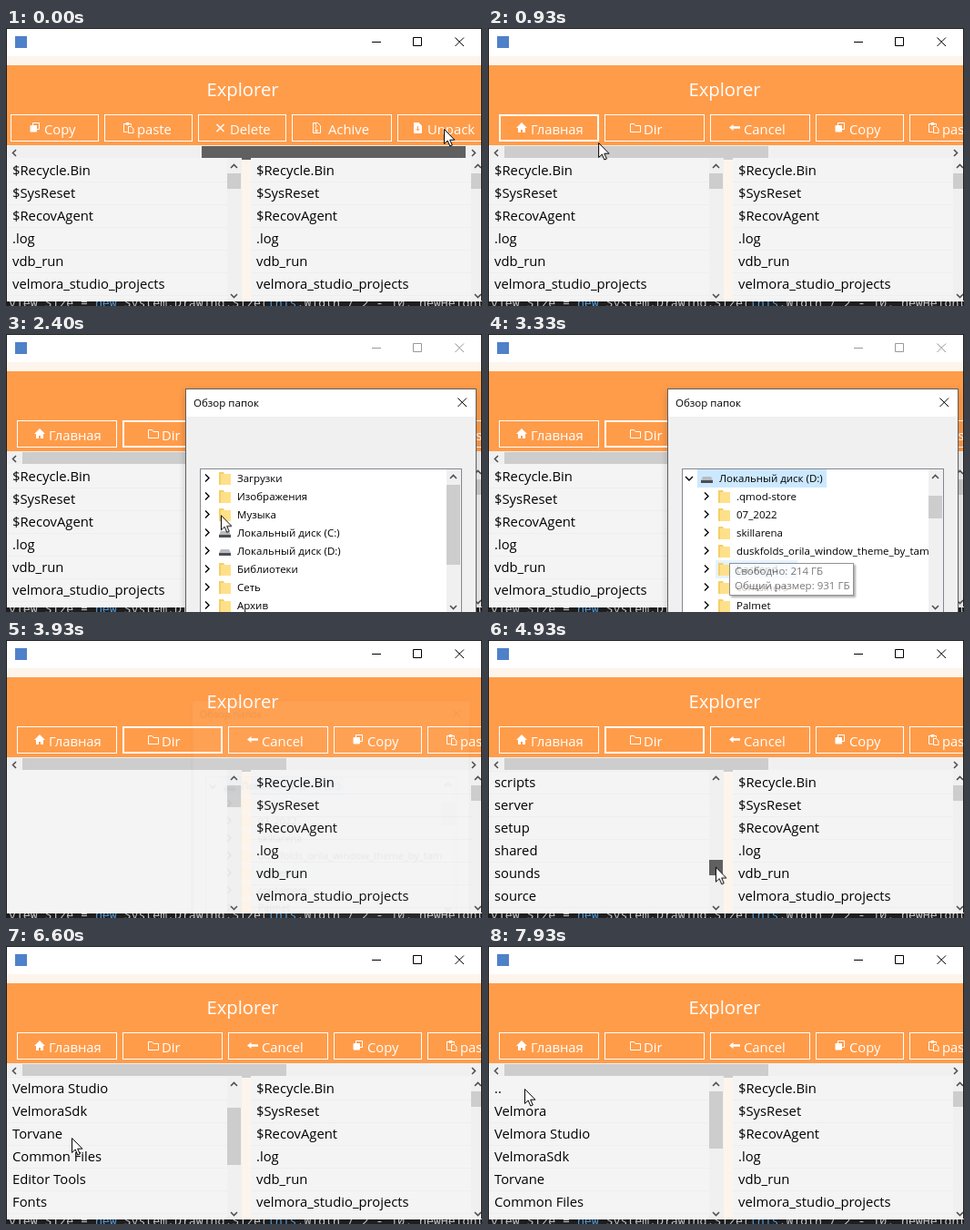
An HTML page for the animation above (8 s loop, 523 by 306 pixels).

```html
<!DOCTYPE html>
<html lang="ru">
<head>
<meta charset="utf-8">
<title>Explorer</title>
<style>
html, body { margin: 0; width: 100%; height: 100%; overflow: hidden; background: #1e1e1e; }
#stage { position: relative; width: 523px; height: 306px; overflow: hidden; background: #1e1e1e;
  font: 14.8px "Open Sans", "Noto Sans", sans-serif; color: #000; white-space: nowrap; }
#stage * { box-sizing: border-box; }
:where(#stage div, #stage svg) { position: absolute; left: 0; top: 0; }
#stage .anim { animation-duration: 8s; animation-iteration-count: infinite; animation-timing-function: linear; }
#stage .step { animation-timing-function: step-end; }
svg { overflow: visible; fill: none; stroke: currentColor; }

.code { left: 3px; top: 293px; font: 13.2px/18px "Noto Sans Mono", monospace; color: #c8c8c8; }
.code i { font-style: normal; color: #569cd6; }
.window { left: 1px; top: 1px; width: 521px; height: 300px; background: #fdf5ec; overflow: hidden; }
.view { left: -1px; top: -1px; width: 523px; height: 306px; }
.titlebar { width: 523px; height: 31px; background: #fff; }
.appicon { left: 10px; top: 9px; width: 13px; height: 13px; background: #4f81c9; }
.controls { animation-name: controls; }
.header { top: 41px; width: 523px; height: 88px; background: #ff9c4a; }
.heading { width: 520px; top: 52px; text-align: center; font-size: 20.3px; line-height: 30px; color: #fff; }
.tools { top: 95px; color: #fff; animation-name: tools; }
.tool { height: 30px; border: 1px solid #fff; }
.tools .label { top: 5px; line-height: 22px; }
.tools svg { top: 9px; }
.focus { height: 30px; width: 110px; border: 2px solid #fff; }
.focus.home { left: 12px; animation-name: homeFocus; }
.focus.dir { left: 128px; animation-name: dirFocus; }

.bar { background: #f0f0f0; color: #505050; }
.thumb { background: #cdcdcd; }
.hbar { left: 1px; top: 129px; width: 521px; height: 16px; }
.hbar .thumb { left: 17px; top: 1px; width: 290px; height: 15px; animation-name: hthumb; }
.pane { top: 143px; width: 258px; height: 158px; background: #f4f4f4; overflow: hidden; }
.pane .bar { left: 242px; width: 16px; height: 158px; }
.pane .thumb { top: 17px; width: 15px; height: 17px; }
.list { top: 2px; width: 242px; }
.list p { margin: 0; height: 25px; padding-left: 6px; line-height: 22px; border-bottom: 1px solid #eee; }
#left .thumb { animation-name: vthumb; }
#drive { animation-name: driveShow; }
#disk { animation-name: diskShow; }
#disk .list { animation-name: diskScroll; }
#folder { animation-name: folderShow; }
#folder .list { animation-name: folderScroll; }

.dialog { left: 197px; top: 60px; width: 320px; height: 290px; background: #f0f0f0; border: 1px solid #606060;
  box-shadow: 0 3px 8px #0003; transform-origin: 160px 143px; font-size: 11.5px; animation-name: dialog; }
.dialog .caption { width: 318px; height: 30px; background: #fff; line-height: 29px; padding-left: 8px; }
.tree { left: 15px; top: 87px; width: 288px; height: 161px; background: #f0f0f0; border: 1px solid #828790; overflow: hidden; }
.tree .bar { left: 270px; width: 16px; height: 159px; }
.tree .thumb { width: 15px; animation-name: treeThumb; }
.rows { width: 270px; height: 159px; background: #fff; }
#places { animation-name: placesShow; }
#children { animation-name: childrenShow; }
.row { height: 20px; line-height: 19px; }
.hl { height: 20px; background: #cce8ff; }
.tip { left: 265px; top: 252px; width: 137px; height: 36px; background: #fff; border: 1px solid #767676; color: #575757;
  box-shadow: 2px 2px 2px #0006; font-size: 11.5px; line-height: 16px; padding: 0 5px; white-space: pre; animation-name: tip; }
.cursor { animation-name: cursor; }

@keyframes controls { 0%, 46.8% { color: #000; } 22.5% { color: #999; } 100% { color: #000; } }
@keyframes tools {
  0%, .875% { transform: translateX(-355px); }
  6.25%, 100% { transform: none; }
}
@keyframes hthumb {
  0%, .875% { transform: translateX(197px); background: #606060; }
  6.25% { transform: none; background: #606060; }
  6.3%, 100% { transform: none; background: #cdcdcd; }
}
@keyframes homeFocus { 0% { visibility: visible; } 22.5%, 100% { visibility: hidden; } }
@keyframes dirFocus { 0%, 76.25%, 100% { visibility: hidden; } 22.5% { visibility: visible; } }
@keyframes driveShow { 0%, 13.3% { visibility: visible; } 12.5%, 47.5%, 100% { visibility: hidden; } }
@keyframes diskShow { 0%, 76.25%, 100% { visibility: hidden; } 50.8% { visibility: visible; } }
@keyframes folderShow { 0% { visibility: hidden; } 76.25%, 100% { visibility: visible; } }
@keyframes diskScroll {
  0%, 55.875% { transform: none; animation-timing-function: steps(30); }
  61.875%, 63.375% { transform: translateY(-750px); animation-timing-function: steps(17); }
  67.125%, 68.375% { transform: translateY(-325px); animation-timing-function: steps(2); }
  70.625%, 100% { transform: translateY(-275px); }
}
@keyframes folderScroll {
  0%, 92.4%, 100% { transform: none; }
  81.6% { transform: translateY(-25px); }
  82.4% { transform: translateY(-50px); }
  83.3% { transform: translateY(-75px); }
  84.1% { transform: translateY(-125px); }
  84.9% { transform: translateY(-150px); }
  90.8% { transform: translateY(-100px); }
  91.6% { transform: translateY(-50px); }
}
@keyframes vthumb {
  0%, 47.49% { top: 17px; height: 17px; background: #cdcdcd; }
  47.5%, 50.8% { top: 17px; height: 24px; }
  50.81%, 55.8% { top: 17px; height: 17px; background: #cdcdcd; }
  55.875% { top: 17px; height: 17px; background: #606060; }
  61.875%, 63.375% { top: 102px; height: 17px; }
  67.125%, 68.375% { top: 54px; height: 17px; }
  70.625% { top: 48px; height: 17px; background: #606060; }
  70.7%, 76.24% { top: 48px; height: 17px; background: #cdcdcd; }
  76.25%, 81.6% { top: 17px; height: 63px; }
  84.9%, 90.8% { top: 82px; height: 63px; }
  92.4%, 100% { top: 17px; height: 63px; background: #cdcdcd; }
}
@keyframes dialog {
  0%, 22.5% { transform: scale(.92); opacity: 0; }
  24.125% { transform: scale(.977); opacity: .52; }
  25.875%, 46.625% { transform: none; opacity: 1; }
  49.125% { transform: scale(.956); opacity: .06; }
  49.625%, 100% { transform: scale(.95); opacity: 0; }
}
@keyframes placesShow { 0%, 37.5%, 100% { opacity: 0; } 25.875% { opacity: 1; } }
@keyframes childrenShow { 0% { opacity: 0; } 37.5%, 100% { opacity: 1; } }
@keyframes treeThumb { 0% { top: 17px; height: 88px; } 37.5%, 100% { top: 29px; height: 25px; } }
@keyframes tip {
  0%, 34.9% { opacity: 0; }
  36%, 41% { opacity: 1; }
  41.625% { opacity: .8; }
  42.875%, 100% { opacity: 0; }
}
@keyframes cursor {
  0%, .875% { transform: translate(481px, 111px); }
  6.25% { transform: translate(284px, 150px); }
  9.375% { transform: translate(84px, 112px); }
  10.2% { transform: translate(90px, 114px); }
  11.625% { transform: translate(121px, 126px); }
  17.5%, 26% { transform: translate(171px, 108px); }
  31.625%, 40.5% { transform: translate(262px, 236px); }
  41.5% { transform: translate(262px, 310px); }
  52% { transform: translate(272px, 310px); }
  55%, 55.875% { transform: translate(248px, 168px); }
  61.875%, 63.375% { transform: translate(250px, 253px); }
  67.125%, 68.375% { transform: translate(247px, 206px); }
  70.625% { transform: translate(246px, 200px); }
  73.375% { transform: translate(73px, 212px); }
  74.125%, 95.5% { transform: translate(72px, 211px); }
  99%, 100% { transform: translate(40px, 157px); }
}
</style>
</head>
<body>
<div id="stage">
  <div class="code">view_Size = <i>new</i> System.Drawing.Size(<i>this</i>.Width / 2 - 10, newHeight</div>
  <div class="window"><div class="view">
    <div class="titlebar">
      <div class="appicon"></div>
      <svg class="controls anim step" width="523" height="31"><path d="M402 15.500h10M447.500 10.500h9v9h-9zM493.500 10.500l9.500 9.500m0-9.500l-9.500 9.500"/></svg>
    </div>
    <div class="header"></div>
    <div class="heading">Explorer</div>
    <div class="tools anim" id="tools">
      <div class="focus home anim step"></div>
      <div class="focus dir anim step"></div>
    </div>
    <div class="bar hbar">
      <div class="thumb anim"></div>
      <svg width="521" height="16" stroke-width="1.6"><path d="M10 5L6.500 8.500 10 12M511 5l3.500 3.500L511 12"/></svg>
    </div>
    <div class="pane" id="left" style="left:1px">
      <div id="drive" class="anim step"></div>
      <div id="disk" class="anim step"></div>
      <div id="folder" class="anim step"></div>
    </div>
    <div class="pane" id="right" style="left:269px"></div>
  </div></div>
  <div class="dialog anim">
    <div class="caption">Обзор папок</div>
    <svg width="320" height="30"><path d="M298.500 9.500l9.500 9.500m0-9.500l-9.500 9.500"/></svg>
    <div class="tree">
      <div class="rows anim step" id="places"></div>
      <div class="rows anim step" id="children"></div>
      <div class="bar">
        <div class="thumb anim step"></div>
        <svg width="16" height="159" stroke-width="1.6"><path d="M4 10l3.500-3.500L11 10M4 150l3.500 3.500L11 150"/></svg>
      </div>
    </div>
  </div>
  <div class="tip anim">Свободно: 214 ГБ
Общий размер: 931 ГБ</div>
  <svg class="cursor anim" width="13" height="20"><path d="M.5.5v16l3.700-3.500 2.600 6 2.500-1-2.600-5.800h5.200z" fill="#fff" stroke="#000"/></svg>
</div>
<script>
const $ = id => document.getElementById(id);
const add = (parent, html) => parent.insertAdjacentHTML('beforeend', html);

const page = 'M2.500.5h5l3 3v8h-8z';
const icons = {
  home: '<path fill="currentColor" stroke="none" d="M6 0L0 6h2v5h3V8h2v3h3V6h2z"/>',
  folder: '<path d="M.5 1.500h4l1.500 2h5.500v7H.5z"/>',
  back: '<path fill="currentColor" stroke="none" d="M0 5.500L4.500 2v2.300H12v2.400H4.500V9z"/>',
  copy: '<path d="M3.500.5h7v7h-7z"/><path fill="currentColor" d="M1 3.500h6.500V10H1z"/>',
  paste: '<path d="M4.500 10.500h-4v-9h8v2M3 .5h3v2H3zM5.500 4.500h3l2.500 2.500v4.500H5.500z"/>',
  cross: '<path stroke-width="1.500" d="M1.500 2l8 8m0-8l-8 8"/>',
  zip: `<path d="${page}M5 1v2m1 0v2M5 5v2m0 1h2v2H5z"/>`,
  unzip: `<path fill="currentColor" d="${page}"/><path stroke="#ff9c4a" d="M6.500 4v5M4.500 7l2 2 2-2"/>`
};
// label, button x, width, icon x, text x, icon
[
  ['Главная', 12, 110, 31, 47, 'home'],
  ['Dir', 128, 110, 156, 171, 'folder'],
  ['Cancel', 244, 110, 265, 281, 'back'],
  ['Copy', 360, 97, 381, 397, 'copy'],
  ['paste', 463, 97, 484, 499, 'paste'],
  ['Delete', 566, 97, 585, 601, 'cross'],
  ['Achive', 669, 110, 690, 709, 'zip'],
  ['Unpack', 785, 110, 801, 818, 'unzip']
].forEach(([label, x, w, iconX, textX, icon]) => add($('tools'),
  `<div class="tool" style="left:${x}px;width:${w}px"></div>
   <svg width="12" height="12" style="left:${iconX}px">${icons[icon]}</svg>
   <div class="label" style="left:${textX}px">${label}</div>`));

const drive = ['$Recycle.Bin', '$SysReset', '$RecovAgent', '.log', 'vdb_run', 'velmora_studio_projects', 'backup'];
const theme = 'duskfolds_orila_window_theme_by_tam';
const disk = ['..', '.qmod-store', '07_2022', 'skillarena', theme, 'backend', 'containers', 'Palmet', 'docs', 'games',
  'images', 'media', 'music', 'Program Files', 'Program Files (x86)', 'projects', 'projectsweb_projectsbac',
  'projectsbackend', 'projectspalmet', 'projectsdesktop', 'projectsfrontend', 'projectsmobile', 'recordings',
  'reports', 'resources', 'samples', 'saves', 'scans', 'scripts', 'server', 'setup', 'shared', 'sounds', 'source',
  'student', 'tasks', 'temp', 'templates', 'tests', 'tools', 'training', 'updates', 'video', 'wallpapers', 'work'];
const folder = ['..', 'Velmora', 'Velmora Studio', 'VelmoraSdk', 'Torvane', 'Common Files', 'Editor Tools', 'Fonts',
  'Games', 'Media Player', 'Runtime', 'Utilities'];
const list = (host, names, cls = '') =>
  add(host, `<div class="list ${cls}">${names.map(n => `<p>${n}</p>`).join('')}</div>`);
list($('drive'), drive);
list($('disk'), disk, 'anim');
list($('folder'), folder, 'anim step');
list($('right'), drive);
['left', 'right'].forEach(id => add($(id), `<div class="bar"><div class="thumb ${id === 'left' ? 'anim' : ''}"></div>
  <svg width="16" height="158" stroke-width="1.6"><path d="M4 11l3.500-3.500L11 11M4 150l3.500 3.500L11 150"/></svg></div>`));

const folderIcon = '<path d="M0 1h5l1 2h7v12H0z" fill="#f5cf66" stroke="none"/><path d="M2 3h11v12H2z" fill="#ffe08a" stroke="none"/>';
const diskIcon = '<path d="M2 6h9l2 4H0z" fill="#b8bcc0" stroke="none"/><path d="M0 10h13v3H0z" fill="#4b4f54" stroke="none"/>';
const row = (host, text, i, indent, { open, isDisk } = {}) => add(host,
  `<div class="row" style="top:${i * 20}px">
    <svg width="300" height="20" stroke="${open ? '#404040' : '#a0a0a0'}" stroke-width="1.400">
      <path d="${open ? 'M3 8l4 4 4-4' : 'M5 5.500l4 4-4 4'}" transform="translate(${indent})"/>
      <g transform="translate(${indent + 20} 2)">${isDisk ? diskIcon : folderIcon}</g>
    </svg>
    <div style="left:${indent + 40}px">${text}</div></div>`);

['Загрузки', 'Изображения', 'Музыка', 'Локальный диск (C:)', 'Локальный диск (D:)', 'Библиотеки', 'Сеть', 'Архив']
  .forEach((text, i) => row($('places'), text, i, 0, { isDisk: i === 3 || i === 4 }));

add($('children'), `<div class="hl" style="left:16px;width:142px"></div>
  <div class="hl" style="left:36px;top:100px;width:90px;background:#e5f3ff"></div>`);
row($('children'), 'Локальный диск (D:)', 0, 0, { open: true, isDisk: true });
['.qmod-store', '07_2022', 'skillarena', theme, 'backend', 'containers', 'Palmet']
  .forEach((text, i) => row($('children'), text, i + 1, 19));
</script>
</body>
</html>
```
